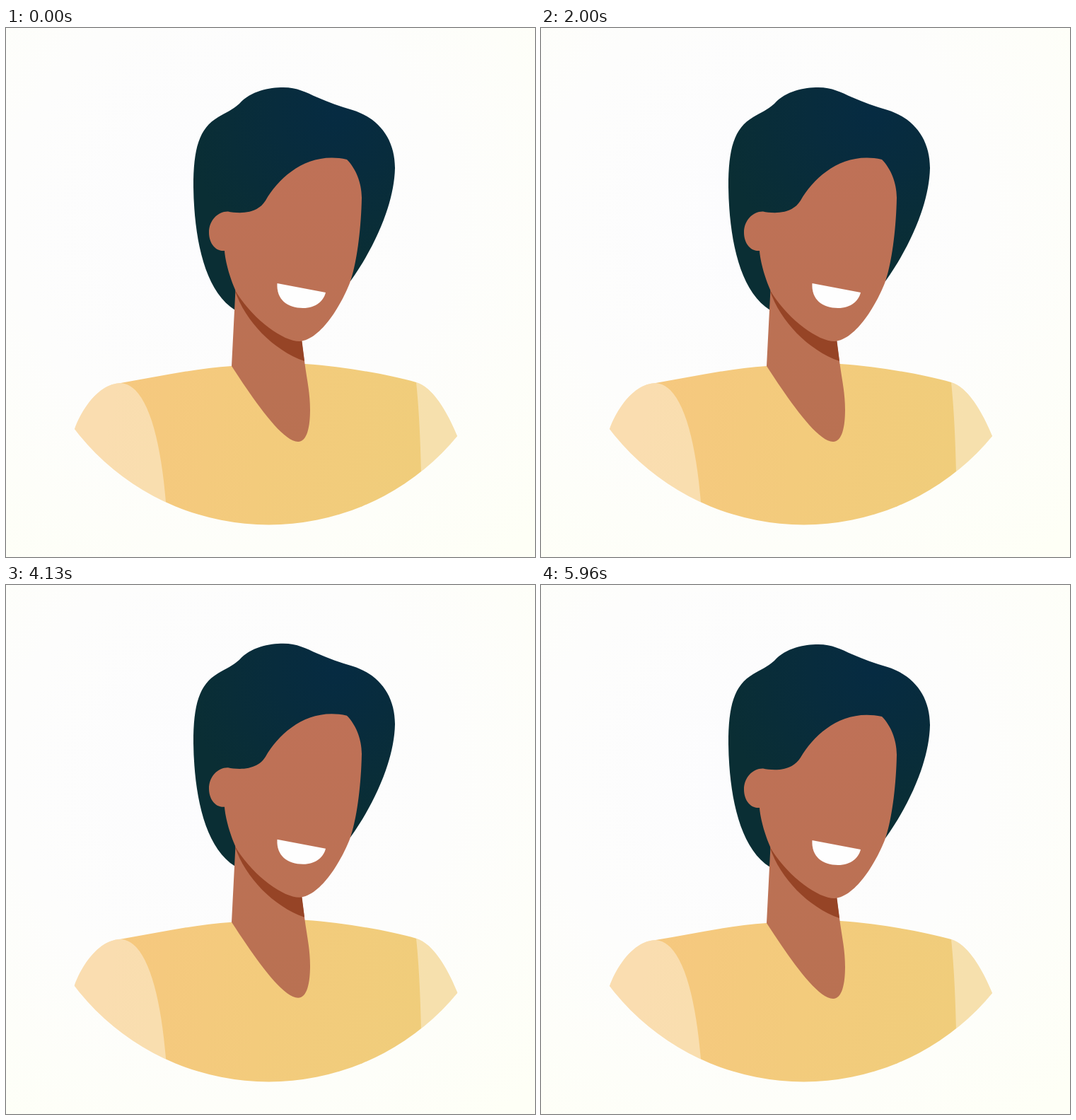
An HTML page for the animation above (6 s loop, 748 by 748 pixels).

```html
<!DOCTYPE html>
<html lang="en">
<head>
<meta charset="utf-8">
<title>Smiling portrait</title>
<style>
  html, body { margin: 0; width: 100%; height: 100%; overflow: hidden; background: #fdfdfc; }
  svg { display: block; width: 100vw; height: 100vh; }
</style>
</head>
<body>
<svg viewBox="0 0 748 748">
  <defs>
    <radialGradient id="paper" gradientUnits="userSpaceOnUse" cx="310" cy="270" r="620">
      <stop offset="0" stop-color="#fcfcfe"/>
      <stop offset=".5" stop-color="#fdfdfc"/>
      <stop offset="1" stop-color="#fefff6"/>
    </radialGradient>
    <radialGradient id="hair" gradientUnits="userSpaceOnUse" cx="470" cy="120" r="220">
      <stop offset="0" stop-color="#062b42"/>
      <stop offset=".4" stop-color="#082c3d"/>
      <stop offset="1" stop-color="#0a2e34"/>
    </radialGradient>
    <linearGradient id="skin" gradientUnits="userSpaceOnUse" x1="0" y1="184" x2="0" y2="585">
      <stop offset="0" stop-color="#bf7157"/>
      <stop offset="1" stop-color="#b97152"/>
    </linearGradient>
    <linearGradient id="shirt" gradientUnits="userSpaceOnUse" x1="150" y1="520" x2="590" y2="600">
      <stop offset="0" stop-color="#f6c87f"/>
      <stop offset=".5" stop-color="#f3cb7c"/>
      <stop offset="1" stop-color="#f0cd7b"/>
    </linearGradient>
    <clipPath id="frame"><circle cx="371.5" cy="356.5" r="346"/></clipPath>
  </defs>

  <rect width="748" height="748" fill="url(#paper)"/>

  <g clip-path="url(#frame)">
    <g id="figure">
      <path fill="url(#hair)" d="M324 399 C280 372 266 295 265 225 C265 170 273 142 300 126
        C312 119 320 116 330 107 C346 89 372 84 392 84 C412 84 424 91 440 98
        C456 105 472 111 490 116 C528 128 550 158 550 198 C549 250 520 312 487 358 L400 300Z"/>

      <path fill="url(#shirt)" d="M162 502 C215 493 270 481 319 478 L423 475 C480 479 540 490 580 501
        C604 508 625 545 638 577 L652 612 V760 H80 V606 L97 567 C108 537 132 503 162 502Z"/>
      <g fill="#fff" fill-opacity=".38">
        <path d="M162 502 C198 504 218 575 226 670 L232 760 H80 V606 L97 567 C108 537 132 503 162 502Z"/>
        <path d="M580 501 C584 540 586 580 587.5 646 V760 H652 V612 L638 577 C625 545 604 508 580 501Z"/>
      </g>

      <path fill="url(#skin)" d="M325 360 L319 478 C349 524 390 585 413 585 C426 585 430 563 430 540
        C430 515 425 495 422 471 L417 435Z"/>
      <path fill="#964426" d="M324 372 C338 414 378 456 422 471 L417.5 435Z"/>
      <path fill="url(#skin)" d="M482 186 C494 198 503 218 503 240 C502 290 495 335 487 358
        C476 388 446 441 415 443 C392 443 352 414 327 376 C317 356 310 330 309 315
        C295 316 287 303 287 289 C287 272 300 259 314 259.5 C326 262 354 265 367 244
        C387 210 427 174 482 186Z"/>
      <path fill="#fefefe" d="M383.5 361 L452 374 C449 386 438 396 420 396 C398 396 382 384 383.5 361Z"/>
    </g>
  </g>
</svg>
<script>
  const LOOP = 6000, FPS = 24, BOB_FRAMES = 48, RISE = 20;
  const figure = document.getElementById('figure');

  function draw(time) {
    const step = Math.floor((time % LOOP + 5) * FPS / 1000) + 1;
    const lift = RISE / 2 * (1 - Math.cos(2 * Math.PI * step / BOB_FRAMES));
    figure.setAttribute('transform', `translate(0 ${-lift.toFixed(2)})`);
  }

  const start = performance.now();
  function tick() {
    draw(performance.now() - start);
    requestAnimationFrame(tick);
  }
  tick();
</script>
</body>
</html>
```
